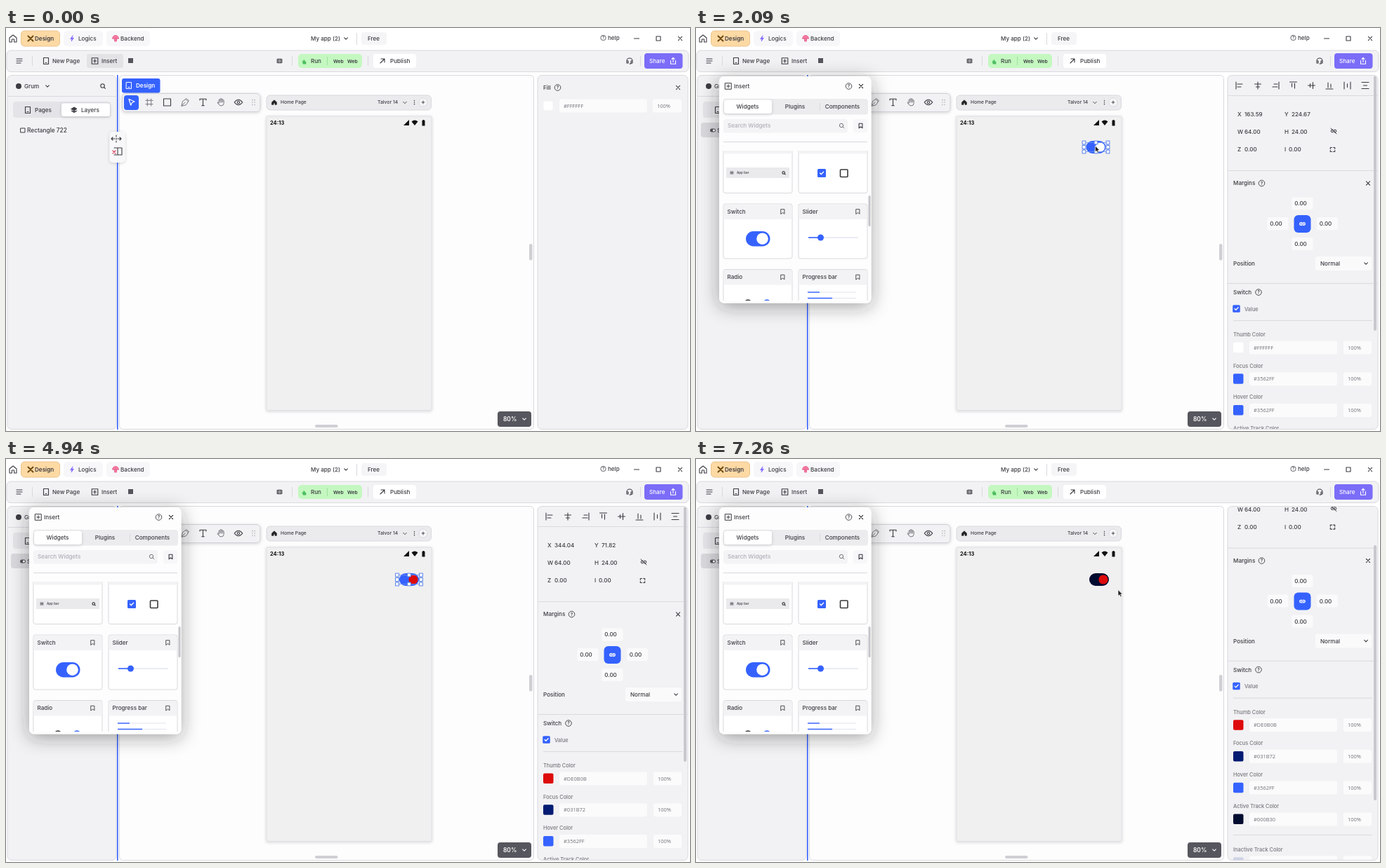
Recreate the animation shown at these times as an HTML page. Size 974x575 px, loop 7.3 s.

```html
<!DOCTYPE html>
<html lang="en">
<head>
<meta charset="utf-8">
<title>Switch colours</title>
<style>
html, body { margin: 0; width: 100%; height: 100%; overflow: hidden; background: #fff; }
svg { display: block; width: 100%; height: 100%; }
text { font-family: Inter, sans-serif; white-space: pre; }
text.field { font-family: "Open Sans", sans-serif; }
</style>
</head>
<body>
<svg id="stage" viewBox="0 0 974 575"></svg>
<script>
const LOOP = 7300, BLUE = '#3562FF', INK = '#3b3b42', PANEL = '#f2f2f4', EDGE = '#d9d9df';

// Drawing helpers; text and icons are centred vertically on y.
const text = (x, y, s, { size = 8.1, weight = 500, fill = INK, anchor = 'start', id = '', cls = '' } = {}) =>
  `<text x="${x}" y="${y + size * .36}" font-size="${size}" font-weight="${weight}" fill="${fill}" text-anchor="${anchor}" id="${id}" class="${cls}">${s}</text>`;
const rect = (x, y, w, h, fill, r = 0, more = '') =>
  `<rect x="${x}" y="${y}" width="${w}" height="${h}" rx="${r}" fill="${fill}" ${more}/>`;
const border = (c = EDGE, w = 1) => `stroke="${c}" stroke-width="${w}"`;
const dot = (x, y, r, fill, more = '') => `<circle cx="${x}" cy="${y}" r="${r}" fill="${fill}" ${more}/>`;
const line = (x1, y1, x2, y2, c = EDGE, w = 1) => `<path d="M${x1} ${y1}L${x2} ${y2}" stroke="${c}" stroke-width="${w}"/>`;
const icon = (x, y, d, c = INK, w = 1.1, fill = 'none') =>
  `<path transform="translate(${x} ${y})" d="${d}" fill="${fill}" stroke="${c}" stroke-width="${w}" stroke-linecap="round" stroke-linejoin="round"/>`;
const field = (x, y, w, s, id = '') =>
  rect(x, y - 9.5, w, 19, '#fbfbfc', 3) + text(x + 6, y, s, { size: 7.5, weight: 400, fill: '#707078', id, cls: 'field' });
const help = (x, y) => dot(x, y, 4.3, 'none', border(INK, .9)) + text(x, y, '?', { size: 6.5, weight: 600, anchor: 'middle' });

const D = {
  home: 'M-5 -1L0 -5L5 -1V5H1.6V1H-1.6V5H-5Z',
  down: 'M-2.3 -1.2L0 1.2L2.3 -1.2',
  close: 'M-2.6 -2.6L2.6 2.6M2.6 -2.6L-2.6 2.6',
  bolt: 'M1 -4L-2.5 .8H0L-1 4L2.5 -.8H0Z',
  page: 'M-3.5 -4.5H3.5V4.5H-3.5ZM-1 2.5H1',
  plusBox: 'M-4.3 -4.3H4.3V4.3H-4.3ZM-2.2 0H2.2M0 -2.2V2.2',
  menu: 'M-4 -3H4M-4 0H4M-4 3H2',
  arrow: 'M-3 3L3 -3M-2 -3H3V2',
  bookmark: 'M-2.4 -3.3H2.4V3.3L0 1.4L-2.4 3.3Z',
  search: 'M2.2 0A2.7 2.7 0 1 1 -3.2 0A2.7 2.7 0 1 1 2.2 0M1.6 2L3.4 3.8',
  layers: 'M-4 -1.6L0 -4L4 -1.6L0 .8ZM-4 1.2L0 3.6L4 1.2',
  hash: 'M-2.6 -5V5M2.6 -5V5M-5 -2.6H5M-5 2.6H5',
  pen: 'M-5 5L-3.5 -1.5L1 -4.5L4.5 -1L1.5 3.5ZM-5 5L0 0M1 -4.5L2 -5.5L5.5 -2L4.5 -1',
  type: 'M-4.5 -3V-4.8H4.5V-3M0 -4.8V4.8M-1.8 4.8H1.8',
  hand: 'M-3 1V-3A.9 .9 0 0 1 -1.2 -3V-4.5A.9 .9 0 0 1 .6 -4.5V-4A.9 .9 0 0 1 2.4 -4V-2.5A.9 .9 0 0 1 4.2 -2.5V1.5Q4 5 0 5Q-2 5 -5 .5Q-4.5 -1 -3 1M-1.2 -3V0M.6 -4V0M2.4 -3V0',
  eye: 'M-5.8 0Q0 -7.5 5.8 0Q0 7.5 -5.8 0ZM1.7 0A1.7 1.7 0 1 1 -1.7 0A1.7 1.7 0 1 1 1.7 0',
  pointer: 'M-3.5 -4.5L4.5 -1L1 .5L-.8 4.2Z',
  link: 'M-.8 -1.8H-2A1.8 1.8 0 0 0 -2 1.8H-.8M.8 -1.8H2A1.8 1.8 0 0 1 2 1.8H.8M-1.6 0H1.6',
  bug: 'M-2.4 -2.8H2.4V2.8H-2.4ZM-3.8 -2H-2.4M-3.8 0H-2.4M-3.8 2H-2.4M3.8 -2H2.4M3.8 0H2.4M3.8 2H2.4M-1.2 -1H1.2M-1.2 1H1.2',
  headset: 'M-4 2V0A4 4 0 0 1 4 0V2M-4 0H-2V3H-4ZM4 0H2V3H4ZM3 3Q2 4.5 0 4',
  share: 'M-3.5 -.5V4.2H3.5V-.5M0 1.5V-4.5M-2 -2.6L0 -4.6L2 -2.6',
  picker: 'M-4 4L-3.5 1.8L.8 -2.5L2.5 -.8L-1.8 3.5ZM0 -3.3L3.3 0M1.6 -1.6L3.4 -3.4',
  corners: 'M-3.2 -1V-3H-1M1 -3H3.2V-1M3.2 1V3H1M-1 3H-3.2V1',
  resize: 'M-2 0H-7M-5 -2L-7 0L-5 2M2 0H7M5 -2L7 0L5 2M0 -5V-3M0 -1V1M0 3V5',
  sidebar: 'M-5 -5H6V5H-5M0 -5V5',
  grip: 'M-1.6 -3.4V-3.3M1.6 -3.4V-3.3M-1.6 0V.1M1.6 0V.1M-1.6 3.4V3.5M1.6 3.4V3.5',
  check: 'M-2.4 0L-.7 1.8L2.6 -1.8'
};

const checkBox = (x, y, s) => rect(x - s / 2, y - s / 2, s, s, BLUE, 1.5) + icon(x, y, D.check, '#fff', 1.3);

const defs = () => {
  const shadow = (id, dy, blur, op) =>
    `<filter id="${id}" x="-40%" y="-40%" width="180%" height="180%"><feDropShadow dx="0" dy="${dy}" stdDeviation="${blur}" flood-color="#222" flood-opacity="${op}"/></filter>`;
  const gradient = (id, stops, more = '') => `<linearGradient id="${id}" ${more}>` +
    stops.map(([c, o], i) => `<stop offset="${i / (stops.length - 1)}" stop-color="${c}" stop-opacity="${o}"/>`).join('') + '</linearGradient>';
  const rainbow = [0, 60, 120, 180, 240, 300, 360].map(h => [`hsl(${h} 100% 50%)`, 1]);
  return '<defs>' + shadow('soft', 1, 2, .18) + shadow('deep', 5, 13, .42) +
    gradient('whiten', [['#fff', 1], ['#fff', 0]]) + gradient('blacken', [['#000', 0], ['#000', 1]], 'x2="0" y2="1"') +
    gradient('rainbow', rainbow) +
    '<linearGradient id="alphaFade"><stop stop-color="#fff" stop-opacity="0"/><stop id="alphaEnd" offset="1"/></linearGradient>' +
    `<pattern id="checker" x="547" y="408" width="11" height="11" patternUnits="userSpaceOnUse">${rect(0, 0, 11, 11, '#fff')}${rect(0, 0, 5.5, 5.5, '#d3d3d6')}${rect(5.5, 5.5, 5.5, 5.5, '#d3d3d6')}</pattern>` +
    '<clipPath id="listClip"><rect x="36" y="175" width="211" height="214"/></clipPath>' +
    '<clipPath id="propClip"><rect x="757.5" y="68" width="213" height="504" rx="6"/></clipPath></defs>';
};

const topBar = () =>
  icon(10, 15, D.home) +
  rect(21.5, 4, 55, 22, '#fdd9a4', 5, border('#e9c48d')) + icon(35, 15, 'M-3.5 -3.5L3.5 3.5M3.5 -3.5L-3.5 3.5', '#6e4a10', 2) + text(41, 15, 'Design', { weight: 600 }) +
  rect(82, 4, 56, 22, '#f7f7f9', 5) + icon(94, 15, D.bolt, '#7b61ff', .6, '#7b61ff') + text(103, 15, 'Logics') +
  rect(143, 4, 62, 22, '#f7f7f9', 5) + icon(156, 15, 'M-4.5 0Q-4 -4.5 0 -4.5Q4 -4.5 4.5 0ZM-1.5 0V4H1.5V0', '#e65486', .7, '#f27aa0') + text(163, 15, 'Backend') +
  text(434, 15, 'My app (2)') + icon(484, 15, D.down) + line(499.5, 7, 499.5, 24) +
  rect(506, 6, 36, 18, '#f5f5f7', 4) + text(515, 15, 'Free') +
  `<g transform="translate(850.5 14) scale(.85)">${help(0, 0)}</g>` + text(857, 14, 'help') +
  icon(898, 15, 'M-3.5 0H3.5') + icon(929, 15, 'M-3 -3H3V3H-3Z') + icon(960, 15, D.close) +
  rect(1, 32, 971, 30.5, PANEL, 6, border()) + icon(19, 47, D.menu) + line(37.5, 40, 37.5, 54) +
  icon(57, 47, D.page) + text(66, 47, 'New Page') +
  rect(115, 37, 52, 20, '#e3e3e6', 3, 'id="insertHover"') + icon(126.5, 47, D.plusBox) + text(136, 47, 'Insert') +
  rect(174, 43, 7, 7, '#55555c') + icon(389.5, 47, D.bug) + line(407.5, 40, 407.5, 54) +
  rect(416, 37, 91, 20, '#c4f8c0', 5) + icon(425, 48, 'M-2 3L-3 -1L-1 0V-3L1 0H2V3Z', '#4bbd60', .6, '#4bbd60') +
  text(434, 47, 'Run') + line(457.5, 41, 457.5, 53, '#a2dfa1') + text(466, 47.5, 'Web', { size: 6.8, weight: 600 }) + text(486, 47.5, 'Web', { size: 6.8, weight: 600 }) +
  line(515.5, 40, 515.5, 54) + rect(523, 37, 61, 20, '#fff', 4) + icon(536, 47, D.arrow) + text(547, 47, 'Publish') +
  icon(888, 47, D.headset) + line(903.5, 40, 903.5, 54) + rect(909, 36, 54.5, 22, '#7b6df8', 4) +
  text(916, 47, 'Share', { fill: '#fff' }) + icon(950, 47, D.share, '#fff');

const leftPanel = () =>
  rect(2, 67.5, 155, 505, PANEL, 6, border()) + dot(18, 83, 4, INK) + text(26, 83, 'Grum') +
  icon(59, 83, D.down) + icon(138, 82.5, D.search) + line(2, 97.5, 157, 97.5) +
  rect(10, 105, 139, 23, '#e4e4e8', 4) + icon(31, 117, D.page) + text(41, 117, 'Pages') +
  rect(79, 107.5, 69, 18.5, '#fff', 3.5, 'filter="url(#soft)"') + icon(97, 117, D.layers, INK, 1, INK) + text(107, 117, 'Layers') +
  `<g id="rectLayer">${icon(24, 146, 'M-3 -3H3V3H-3Z', INK, 1)}${text(30, 146, 'Rectangle 722', { size: 8.3 })}</g>` +
  `<g id="switchLayer">${rect(7, 135, 143, 21, '#d8d8dd', 4)}${rect(20, 143.5, 8, 5, '#55555c', 2.5)}${dot(25.4, 146, 1.6, '#fff')}${text(30, 146, 'Switch')}</g>`;

const canvas = () =>
  rect(161.5, 67.5, 590, 505, '#fdfdfd', 5, border()) + line(158.8, 67, 158.8, 573, BLUE, 1.6) +
  rect(165, 72, 54.5, 20.5, BLUE, 3) + icon(175, 82, D.page, '#fff', 1) + text(185, 82, 'Design', { fill: '#fff', weight: 600 }) +
  rect(165.5, 93.5, 196.5, 26, PANEL, 5, border('#cfcfd8') + ' filter="url(#soft)"') + rect(168, 96, 21, 21, BLUE, 4) +
  icon(178.5, 106, D.pointer, '#fff', 1.2) + icon(204, 106, D.hash, '#88888e') + icon(229.5, 106, 'M-5 -5H5V5H-5Z') +
  icon(255, 106, D.pen, '#77777e', 1) + icon(280.5, 106, D.type) + icon(306, 106, D.hand, '#77777e', 1) + icon(331, 106, D.eye) + icon(352.5, 106, D.grip, '#aaaab0', 1.5) +
  rect(371, 96, 234.5, 21, '#ebebee', 5, border()) + icon(382, 106, 'M-3.3 -.2L0 -3.2L3.3 -.2V3.3H1V1H-1V3.3H-3.3Z', '#222', .7, '#222') +
  text(391, 106, 'Home Page', { size: 6.7 }) + text(529, 106, 'Talvor 14', { size: 6.8 }) + icon(568, 106.5, D.down, INK, .9) +
  icon(581.5, 106, 'M0 -2.6V-2.5M0 0V.1M0 2.6V2.7', INK, 1.5) + dot(594, 106, 6, '#f7f7f9', border()) + icon(594, 106, 'M-2 0H2M0 -2V2', INK, .9) +
  rect(371, 126, 235, 419.5, '#f0f0f0', 1, border('#dedee6') + ' filter="url(#soft)"') + text(376, 135, '24:13', { size: 7.5, weight: 700, fill: '#111' }) +
  `<path d="M566 139L574 131V139ZM577.5 133.5Q582 129.500 586.500 133.500L582 139ZM592.500 132H593.500V131H595.500V132H596.500V139.500H592.500Z" fill="#111"/>` +
  rect(745, 308, 4.5, 23.500, '#cfcfd4', 2) + rect(440, 566, 32.5, 4, '#cfcfd4', 2) +
  rect(700, 547, 48, 22, '#56565e', 4) + text(708, 558, '80%', { fill: '#fff', weight: 600, size: 8.4 }) + icon(738, 558, D.down, '#fff') +
  rect(147.5, 148, 22, 44, '#f8f8fa', 5, 'filter="url(#soft)"') + icon(157, 158, D.resize) + icon(159, 176, D.sidebar) + icon(154, 177, 'M-2 -2L2 2M2 -2L-2 2', '#d8324e');

const card = (x, y, name, body) =>
  rect(x, y, 98, 78, '#fff', 3, border()) + rect(x + .5, y + .5, 97, 21.500, '#f3f3f5', 3) +
  text(x + 5.5, y + 11, name) + icon(x + 84.5, y + 11, D.bookmark, INK, .9) + body;

const insertPopup = () => {
  const appBar = rect(43, 199, 90, 15, '#eaeaed') + icon(51, 206.500, 'M-2 -1.5H2M-2 0H2M-2 1.500H2', INK, .8) +
    text(58, 206.500, 'App bar', { size: 4.6 }) + `<g transform="translate(125 206.500) scale(.65)">${icon(0, 0, D.search, '#222', 1.6)}</g>`;
  const boxes = checkBox(179, 207, 12) + rect(205.5, 202, 10.5, 10.5, 'none', 1, border('#3a3a3a', 1.6));
  const toggle = rect(71, 290, 34.5, 21.5, BLUE, 10.7) + dot(94.5, 300.700, 8.3, '#fff');
  const slider = line(160, 299, 231, 299, '#d5d9e8') + line(160, 299, 178, 299, BLUE, 1.6) + dot(177.5, 299, 4.5, BLUE);
  const radios = dot(74, 393, 5, 'none', border('#333', 1.6)) + dot(101, 393, 5, 'none', border(BLUE, 1.6)) + dot(101, 393, 2.5, BLUE);
  const bars = line(159, 377, 228, 377, '#e0e3ee') + line(159, 377, 176, 377, BLUE, 1.4) + line(159, 385.500, 228, 385.500, '#e0e3ee') + line(159, 385.500, 194, 385.500, BLUE, 1.4);
  return '<g id="insertPopup">' + rect(33, 69, 216.5, 323.5, '#fdfdfd', 7, 'filter="url(#deep)"') +
    icon(46, 83, D.plusBox, INK, 1) + text(54, 83, 'Insert') + help(217.5, 83) + icon(235, 83, D.close, '#222') +
    rect(39, 101, 206, 22.5, '#ececef', 4) + rect(40, 102.500, 68, 19.5, '#fff', 4, 'filter="url(#soft)"') +
    text(73.5, 112.5, 'Widgets', { anchor: 'middle' }) + text(141, 112.5, 'Plugins', { anchor: 'middle' }) + line(176.500, 107, 176.500, 118) + text(208.500, 112.5, 'Components', { anchor: 'middle' }) +
    rect(39, 130, 177, 19.5, '#f4f4f6', 4) + text(45, 139.5, 'Search Widgets', { fill: '#aeaeb8' }) + icon(207.5, 139, D.search, '#77777e', 1) +
    rect(224, 130, 20, 19.5, '#f7f7f9', 4) + icon(234.500, 139.500, D.bookmark) + line(39, 162.500, 244, 162.500) +
    '<g clip-path="url(#listClip)"><g id="widgetList">' +
    card(39, 157.500, 'App bar', appBar) + card(146, 157.500, 'Checkbox', boxes) +
    card(39, 251, 'Switch', toggle) + card(146, 251, 'Slider', slider) +
    card(39, 344.500, 'Radio', radios) + card(146, 344.500, 'Progress bar', bars) +
    '</g></g>' + rect(245.5, 239, 3, 44, '#c4c4ca', 1.5) + '</g>';
};

const swatchRow = (y, name, id) => text(765, y, name, { size: 7.4, fill: '#77777e' }) +
  rect(765, y + 11.3, 14.5, 14.5, '#fff', 2, `id="${id}Swatch"`) + field(788, y + 18.7, 125, '', id + 'Hex') + field(922, y + 18.7, 40, '100%');

const alignIcons = () => {
  const h = 'M-5 -5V5M-3 -2H4M-3 2H2', bar = 'M0 -5V5M-4.500 -2H4.500M-2.500 2H2.500';
  const turn = (x, d, a) => `<g transform="translate(${x} 82) rotate(${a})">${icon(0, 0, d)}</g>`;
  return [[774, h, 0], [800, bar, 0], [825, h, 180], [850.5, h, 90], [876.5, bar, 90], [902, h, -90]].map(a => turn(...a)).join('') +
    turn(927.5, 'M-4.5 -5V5M4.5 -5V5M0 -2.5V2.5', 0) + turn(953, 'M-4.5 -5V5M4.5 -5V5M0 -2.5V2.5', 90);
};

const rightPanel = () => {
  const pair = (x, y, label, value, id = '') => text(x, y, label) + text(x + 10, y, value, { id });
  const margin = (x, y) => rect(x - 15, y - 9, 30, 18, '#fafafb', 3) + text(x - 2.500, y, '0.00', { anchor: 'middle' });
  const rule = y => line(757, y, 971, y);
  return rect(757, 67.5, 214, 505, PANEL, 6, border()) +
    '<g id="fillPane">' + text(765, 85, 'Fill') + help(785.500, 85) + icon(957, 85, D.close) +
    rect(765.5, 104.500, 13, 13, '#fff', 2) + field(788, 111, 125, '#FFFFFF') + field(921, 111, 41, '100%') + '</g>' +
    '<g id="propPane" clip-path="url(#propClip)"><g id="props">' + alignIcons() + rule(96.500) +
    pair(771, 123, 'X', '', 'xValue') + pair(838, 123, 'Y', '', 'yValue') + pair(771, 148, 'W', '64.00') + pair(838, 148, 'H', '24.00') +
    pair(771, 173.500, 'Z', '0.00') + text(838, 173.500, 'I') + text(844, 173.500, '0.00') +
    icon(908, 147, D.link, INK, 1) + icon(908, 147, 'M-4 -4L4 4', INK, 1) + icon(906.500, 173.500, D.corners) + rule(203.500) +
    text(765, 221.500, 'Margins') + help(805.500, 221.500) + icon(957, 221.500, D.close) +
    margin(863.500, 250.500) + margin(828.500, 279) + margin(899, 279) + margin(863.500, 308) + rect(851.500, 267, 24, 25, BLUE, 6) + icon(863.500, 279.500, D.link, '#fff', 1.3) +
    text(765, 336.500, 'Position') + rect(882, 326, 80, 20, '#fafafb', 3) + text(889, 336, 'Normal') + icon(954, 336, D.down) + rule(364.500) +
    text(765, 377.500, 'Switch') + help(801, 377) + checkBox(769.500, 400.500, 10.500) + text(781, 401, 'Value', { size: 7.4, fill: '#77777e' }) + line(765, 417.500, 963, 417.500) +
    swatchRow(437.300, 'Thumb Color', 'thumb') + swatchRow(482, 'Focus Color', 'focus') + swatchRow(526.800, 'Hover Color', 'hover') + swatchRow(571.600, 'Active Track Color', 'active') +
    line(765, 613, 963, 613) + swatchRow(633.400, 'Inactive Track Color', 'inactive') + '</g>' +
    rect(965, 68, 4, 364, '#c8c8ce', 2, 'id="propBar"') + '</g>';
};

const switchWidget = () => {
  const handles = [[-17, -6.500], [-17, 0], [-17, 6.500], [0, -6.500], [0, 6.500], [17, -6.500], [17, 0], [17, 6.500]]
    .map(([x, y]) => rect(x - 2.400, y - 2.400, 4.800, 4.800, '#fff', 0, border('#4a78e8', .9))).join('');
  return '<g id="switch">' + rect(-14, -9, 28, 18, BLUE, 9, 'id="track"') + dot(6, 0, 6.600, '#fff', 'id="knob"') +
    `<g id="handles">${rect(-17, -6.500, 34, 13, 'none', 0, border('#6d93ee', .8))}${handles}</g></g>`;
};

const pickerPopup = () => '<g id="picker">' + rect(538.5, 229, 200, 314, '#fdfdfd', 8, 'filter="url(#deep)"') +
  help(709.500, 241) + icon(727, 241, D.close, '#222') +
  rect(543.500, 252, 190, 134, '#f00', 2, 'id="hueFill"') + rect(543.500, 252, 190, 134, 'url(#whiten)', 2) + rect(543.500, 252, 190, 134, 'url(#blacken)', 2) +
  dot(0, 0, 5, 'none', border('#fff', 1.400) + ' id="shadeMark" filter="url(#soft)"') +
  rect(547, 392.500, 183, 10.500, 'url(#rainbow)', 3) + dot(0, 397.700, 5, 'red', border('#fff', 1.400) + ' id="hueMark"') +
  rect(547, 408, 183, 11, 'url(#checker)', 3) + rect(547, 408, 183, 11, 'url(#alphaFade)', 3) +
  dot(729.500, 413.700, 4.800, '#fff', border('#fff', 1.400) + ' id="alphaMark" filter="url(#soft)"') +
  rect(544, 424, 21, 20, '#f4f4f6', 4) + icon(554.500, 434, D.picker, '#222') + text(582, 434, 'HEX') +
  rect(608, 424, 76, 20, '#f3f3f5', 3) + text(615, 433.500, '', { size: 7.500, weight: 400, fill: '#707078', id: 'pickerHex', cls: 'field' }) +
  rect(692, 424, 41, 20, '#f3f3f5', 3) + text(699, 433.500, '100%', { size: 7.500, weight: 400, fill: '#707078', cls: 'field' }) +
  line(544, 451.500, 733, 451.500, '#e6e6ea') + text(544, 463.500, 'Color Library', { size: 7.500, fill: '#66666d' }) + text(551, 476, 'App Colors') + icon(605, 476, D.down) +
  rect(543.500, 486.500, 190, 54, '#f2f2f4', 4) + rect(551, 494, 13, 13, '#fafafb', 3, border('#88888e', .9)) + icon(557.500, 500.500, 'M-2.500 0H2.500M0 -2.500V2.500') + '</g>';

document.getElementById('stage').innerHTML = defs() + rect(0, 0, 974, 575, '#fff') + topBar() + leftPanel() + canvas() + rightPanel() +
  insertPopup() + switchWidget() + pickerPopup() +
  '<path id="cursor" d="M0 0V9L2.100 7.200L3.600 10.300L5.200 9.500L3.700 6.600H6.400Z" fill="#222" stroke="#fff" stroke-width=".7"/>';

const el = {};
document.querySelectorAll('[id]').forEach(e => { if (e.id) el[e.id] = e; });
const set = (id, attrs) => Object.entries(attrs).forEach(([k, v]) => el[id].setAttribute(k, v));
const show = (id, on) => set(id, { visibility: on ? 'visible' : 'hidden' });
const move = (id, x, y) => set(id, { transform: `translate(${x} ${y})` });

// Eased interpolation through [time, ...values] stops.
const follow = (t, stops) => {
  const i = stops.findIndex(s => s[0] > t);
  if (i < 0) return stops.at(-1).slice(1);
  if (!i) return stops[0].slice(1);
  const a = stops[i - 1], b = stops[i], u = (t - a[0]) / (b[0] - a[0]), e = u * u * (3 - 2 * u);
  return a.slice(1).map((v, k) => v + (b[k + 1] - v) * e);
};

const toHsv = hex => {
  const [r, g, b] = [1, 3, 5].map(i => parseInt(hex.slice(i, i + 2), 16) / 255);
  const v = Math.max(r, g, b), c = v - Math.min(r, g, b);
  const h = !c ? 0 : v === r ? ((g - b) / c + 6) % 6 : v === g ? (b - r) / c + 2 : (r - g) / c + 4;
  return [h * 60, v && c / v, v];
};
const toHex = ([h, s, v]) => '#' + [5, 3, 1].map(n => {
  const k = (n + h / 60) % 6;
  return Math.round(255 * v * (1 - s * Math.max(0, Math.min(k, 4 - k, 1)))).toString(16).padStart(2, '0');
}).join('').toUpperCase();

const edits = {
  focus: { open: 2600, close: 3350, stops: [[2750, BLUE], [3150, '#031B72']] },
  thumb: { open: 3650, close: 4750, stops: [[3950, '#FFFFFF'], [4450, '#DE0B0B']] },
  active: { open: 5450, close: 6650, stops: [[5600, BLUE], [5900, '#CFD4E6'], [6400, '#000B30']] }
};
Object.values(edits).forEach(e => { e.stops = e.stops.map(([t, hex]) => [t, ...toHsv(hex)]); });

const DROP = 1450, SETTLED = 2200, DESELECT = 7100;
const switchPath = [[900, 88, 300], [DROP, 478, 266], [1650, 478, 266], [2090, 569.5, 170], [SETTLED, 574, 172]];
const exitPath = [[6900, 640, 215], [DESELECT, 601, 186.500]];

function drawPicker([h, s, v], hex) {
  const hue = toHex([h, 1, 1]);
  set('hueFill', { fill: hue });
  set('shadeMark', { cx: 543.5 + 190 * s, cy: 252 + 134 * (1 - v), fill: hex });
  set('hueMark', { cx: 547 + 183 * h / 360, fill: hue });
  set('alphaEnd', { 'stop-color': hex });
  set('alphaMark', { fill: hex });
  el.pickerHex.textContent = hex;
}

function render(t) {
  const dropped = t >= DROP;
  show('insertHover', t < 220);
  show('insertPopup', t >= 220);
  move('widgetList', 0, follow(t, [[300, 24], [650, 0]])[0]);
  show('rectLayer', !dropped);
  show('switchLayer', dropped);
  show('fillPane', !dropped);
  show('propPane', dropped);

  const [x, y] = follow(t, switchPath);
  show('switch', t >= 900);
  show('handles', dropped && t < DESELECT);
  move('switch', x, y);
  el.xValue.textContent = t < SETTLED ? '163.59' : '344.04';
  el.yValue.textContent = t < SETTLED ? '224.67' : '71.82';

  const colors = { hover: BLUE, inactive: '#CFD4E6' };
  let picking = false;
  for (const [name, edit] of Object.entries(edits)) {
    const hsv = follow(t, edit.stops);
    colors[name] = toHex(hsv);
    if (t >= edit.open && t < edit.close) {
      picking = true;
      drawPicker(hsv, colors[name]);
    }
  }
  show('picker', picking);
  for (const [name, hex] of Object.entries(colors)) {
    set(name + 'Swatch', { fill: hex });
    el[name + 'Hex'].textContent = hex;
  }
  set('track', { fill: colors.active });
  set('knob', { fill: colors.thumb });

  const [scroll] = follow(t, [[4990, 0], [5270, 76.4]]);
  move('props', 0, -scroll);
  move('propBar', 0, scroll * .72);

  const leaving = t >= 6900;
  show('cursor', leaving || (t >= 900 && t < 2350));
  const [cx, cy] = leaving ? follow(t, exitPath) : [x - 1, y - 2];
  move('cursor', cx, cy);
}

const start = performance.now();
function tick() {
  render((performance.now() - start) % LOOP);
  requestAnimationFrame(tick);
}
tick();
</script>
</body>
</html>
```
